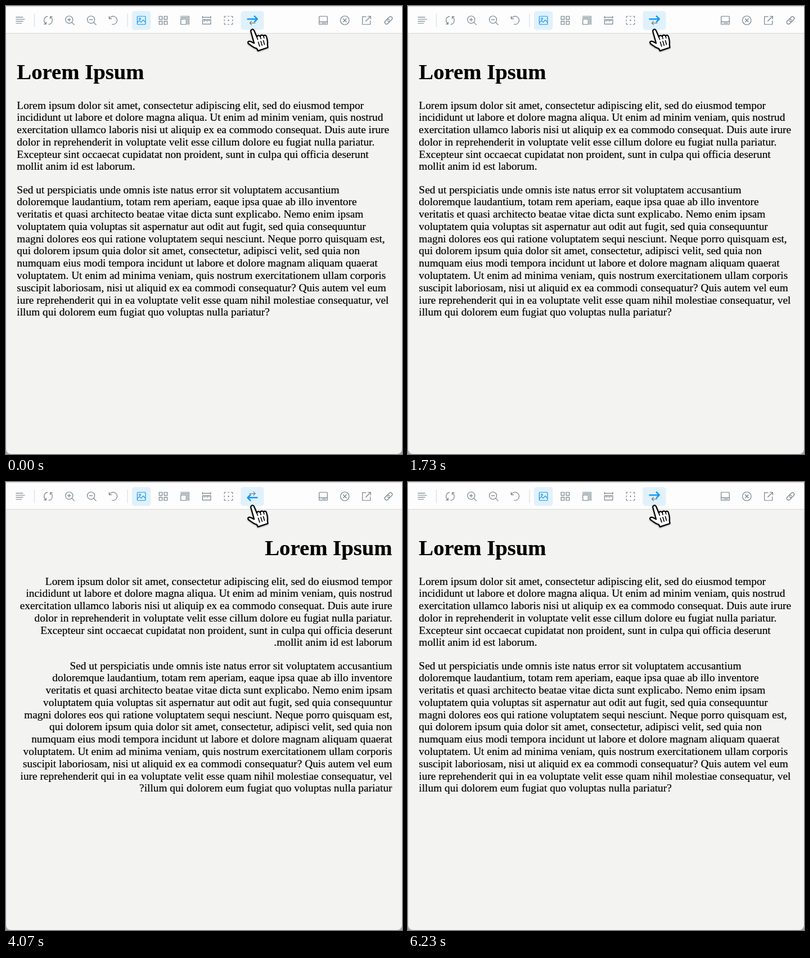
Animation, 704 px wide and 796 px high, one loop 6260 ms. Source, as an HTML page:

```html
<!DOCTYPE html>
<html lang="la">
<head>
<meta charset="utf-8">
<title>Text direction toggle</title>
<style>
  html, body { margin: 0; width: 100%; height: 100%; overflow: hidden; background: #a9a9a9; }
  #stage {
    position: relative; width: 704px; height: 796px; overflow: hidden;
    background: #f3f3f2; border-radius: 0 0 9px 9px;
    box-shadow: inset 1px 0 #e2e2e2, inset -1px 0 #ececec;
  }
  svg { position: absolute; left: 0; top: 0; }
  article {
    position: absolute; left: 19.36px; top: 94.8px; width: 667.2px;
    font: 19.36px/21.78px "Liberation Serif", "Times New Roman", Times, serif;
    color: #000; -webkit-text-stroke: .2px #000;
  }
  h1 { margin: 0 0 25.94px; font-size: 38.72px; line-height: 44.77px; font-weight: bold; }
  p { margin: 0 0 19.36px; }
  .icons { fill: none; stroke: #73828c; stroke-width: 1; stroke-linecap: round; stroke-linejoin: round; }
  .blue { stroke: #1198f6; }
  .bold { stroke: #1198f6; stroke-width: 2.5; }
  .thin { stroke: #6d8494; stroke-width: 1.3; }
  #rtlIcon { visibility: hidden; }
  .rtl #rtlIcon { visibility: visible; }
  .rtl #ltrIcon { visibility: hidden; }
</style>
</head>
<body>
<div id="stage">
  <article id="page" dir="ltr">
    <h1>Lorem Ipsum</h1>
    <p>Lorem ipsum dolor sit amet, consectetur adipiscing elit, sed do eiusmod tempor
      incididunt ut labore et dolore magna aliqua. Ut enim ad minim veniam, quis nostrud
      exercitation ullamco laboris nisi ut aliquip ex ea commodo consequat. Duis aute irure
      dolor in reprehenderit in voluptate velit esse cillum dolore eu fugiat nulla pariatur.
      Excepteur sint occaecat cupidatat non proident, sunt in culpa qui officia deserunt
      mollit anim id est laborum.</p>
    <p>Sed ut perspiciatis unde omnis iste natus error sit voluptatem accusantium
      doloremque laudantium, totam rem aperiam, eaque ipsa quae ab illo inventore
      veritatis et quasi architecto beatae vitae dicta sunt explicabo. Nemo enim ipsam
      voluptatem quia voluptas sit aspernatur aut odit aut fugit, sed quia consequuntur
      magni dolores eos qui ratione voluptatem sequi nesciunt. Neque porro quisquam est,
      qui dolorem ipsum quia dolor sit amet, consectetur, adipisci velit, sed quia non
      numquam eius modi tempora incidunt ut labore et dolore magnam aliquam quaerat
      voluptatem. Ut enim ad minima veniam, quis nostrum exercitationem ullam corporis
      suscipit laboriosam, nisi ut aliquid ex ea commodi consequatur? Quis autem vel eum
      iure reprehenderit qui in ea voluptate velit esse quam nihil molestiae consequatur, vel
      illum qui dolorem eum fugiat quo voluptas nulla pariatur?</p>
  </article>

  <svg id="bar" width="704" height="90" viewBox="0 0 704 90">
    <rect width="704" height="48.5" fill="#fdfdfd"/>
    <rect width="704" height="1.5" fill="#dcdcde"/>
    <rect y="48" width="704" height="1.2" fill="#dadada"/>
    <path d="M50.5 13.5v24M216 13.5v24" stroke="#d5dfe5" stroke-width="1.2"/>
    <rect x="224" y="9" width="33.5" height="33.5" rx="4.8" fill="#e0f1fc"/>
    <rect x="417.5" y="9" width="41" height="33.5" rx="4.8" fill="#e0f1fc"/>

    <g class="icons">
      <!-- menu -->
      <path transform="translate(25.5 25.3) scale(1.21)" d="M-6.3-4.5h10M-6.3-1.5H6.3M-6.3 1.5h10M-6.3 4.5h8"/>
      <!-- reload -->
      <path transform="translate(75 25.5) scale(1.21)" d="M-6 5.5h3v-3M-3 5.2A6 6 0 0 1-1-5.9M6-5.5H3v3M3-5.2A6 6 0 0 1 1 5.9"/>
      <!-- zoom in, out, reset -->
      <g transform="translate(113.5 25.5) scale(1.21)">
        <circle cx="-1" cy="-1" r="5.4"/><path d="M3 3l3.5 3.5M-3.3-1h4.6M-1-3.3v4.6"/>
      </g>
      <g transform="translate(152.3 25.5) scale(1.21)">
        <circle cx="-1" cy="-1" r="5.4"/><path d="M3 3l3.5 3.5M-3.3-1h4.6"/>
      </g>
      <path transform="translate(191 25.5) scale(1.21)" d="M-6.3-6v3.6h3.6M-6-2.6A6 6 0 1 1-2 5.8"/>
      <!-- picture -->
      <g class="blue" transform="translate(240.7 25.5) scale(1.21)">
        <rect x="-6" y="-6" width="12" height="12" rx=".8"/>
        <circle cx="-2.2" cy="-2.3" r="1.2"/>
        <path d="M-6 3.3l3.2-3 2.5 2.5L2.7-.6 6 2.8"/>
      </g>
      <!-- grid -->
      <path transform="translate(279.5 25.5) scale(1.21)" d="M-6-6h4.6v4.6H-6zM1.4-6H6v4.6H1.4zM-6 1.4h4.6V6H-6zM1.4 1.4H6V6H1.4z"/>
      <!-- viewport -->
      <path transform="translate(318 25.5) scale(1.21)" d="M-6-2h8v8h-8zM-6-4H4V6M-6-6H6V6"/>
      <!-- ruler -->
      <path transform="translate(356.7 25.5) scale(1.21)" d="M-6-6v3M6-6v3M-6-4.5H6M-6-1H6v6.5H-6zM-3.6-1v2.6M-1.2-1v1.8M1.2-1v2.6M3.6-1v1.8"/>
      <!-- outline -->
      <g transform="translate(395.5 25.5) scale(1.21)">
        <rect x="-6" y="-6" width="12" height="12" stroke-linecap="butt" stroke-dasharray="2.5 2.2 2.6 2.2 2.5 0"/>
        <path d="M-.7 0h1.4M0-.7v1.4"/>
      </g>
      <!-- direction -->
      <g id="ltrIcon">
        <path class="thin" d="M443 30.3h-9.5M436.5 27.3l-3.2 3 3.2 3"/>
        <path class="bold" d="M429.5 23.2h17M441.8 18.2l5 5-5 5"/>
      </g>
      <g id="rtlIcon">
        <path class="thin" d="M433 20.6h10M440 17.5l3.3 3.1-3.3 3"/>
        <path class="bold" d="M446.5 27.8h-17M434.5 22.8l-5 5 5 5"/>
      </g>
      <!-- panel -->
      <g transform="translate(564 25.5) scale(1.21)">
        <rect x="-6" y="-6" width="12" height="12" rx=".8"/>
        <path d="M-6 2H6M-3.8 4h.1M-1.8 4h5.6"/>
      </g>
      <!-- close -->
      <g transform="translate(602.3 25.5) scale(1.21)">
        <circle r="6.4"/><path d="M-2.3-2.3l4.6 4.6M2.3-2.3l-4.6 4.6"/>
      </g>
      <!-- open -->
      <path transform="translate(641 25.5) scale(1.21)" d="M-.8-5.5H-6V6H5.5V.8M2-6h4v4M6-6L-1.2 1.2"/>
      <!-- link -->
      <g transform="translate(680 25.5) scale(1.21) rotate(-45)">
        <path id="loop" d="M-.3 2.6h-3.8a2.6 2.6 0 0 1 0-5.2h3a2.6 2.6 0 0 1 2.4 3.5"/>
        <use href="#loop" transform="rotate(180)"/>
      </g>
    </g>

    <!-- pointer -->
    <g stroke="#000" stroke-linecap="round" stroke-linejoin="round" style="filter:drop-shadow(0 1.5px 1.2px #0006)">
      <path fill="#fff" stroke-width="2.2" d="M435.5 46C434.2 41.5 439 39.8 441 43.5L446 55.2C446.5 51.8 450.5 51.3 452 54.2C452.6 51 456.8 50.8 458 53.6C459 51 462.3 51.4 463 54.5C464.6 59.5 465.8 63.5 464.7 68L465.5 73.8L448 79.6L445.8 75.6C440 74.2 436 70.4 431.2 67C428.6 64 431.6 61.6 435 63L441.2 66.2Z"/>
      <path fill="none" stroke-width="1.6" d="M446 55.2l1.5 4.3M452 54.2l1.2 4M458 53.6l.9 3.4M448.5 64l2.4 7.6M453 62.6l2.3 7.5M457.5 61.3l2 7.2"/>
    </g>
  </svg>
</div>
<script>
  const LOOP = 6260;
  const page = document.getElementById('page');
  const bar = document.getElementById('bar');
  const between = (t, from, to) => t >= from && t < to;

  // The toolbar icon follows the page text with a short delay.
  function draw(now) {
    const t = now % LOOP;
    page.dir = between(t, 2500, 5880) ? 'rtl' : 'ltr';
    bar.classList.toggle('rtl', between(t, 2570, 5950));
  }

  const start = performance.now();
  function tick() {
    draw(performance.now() - start);
    requestAnimationFrame(tick);
  }
  tick();
</script>
</body>
</html>
```
